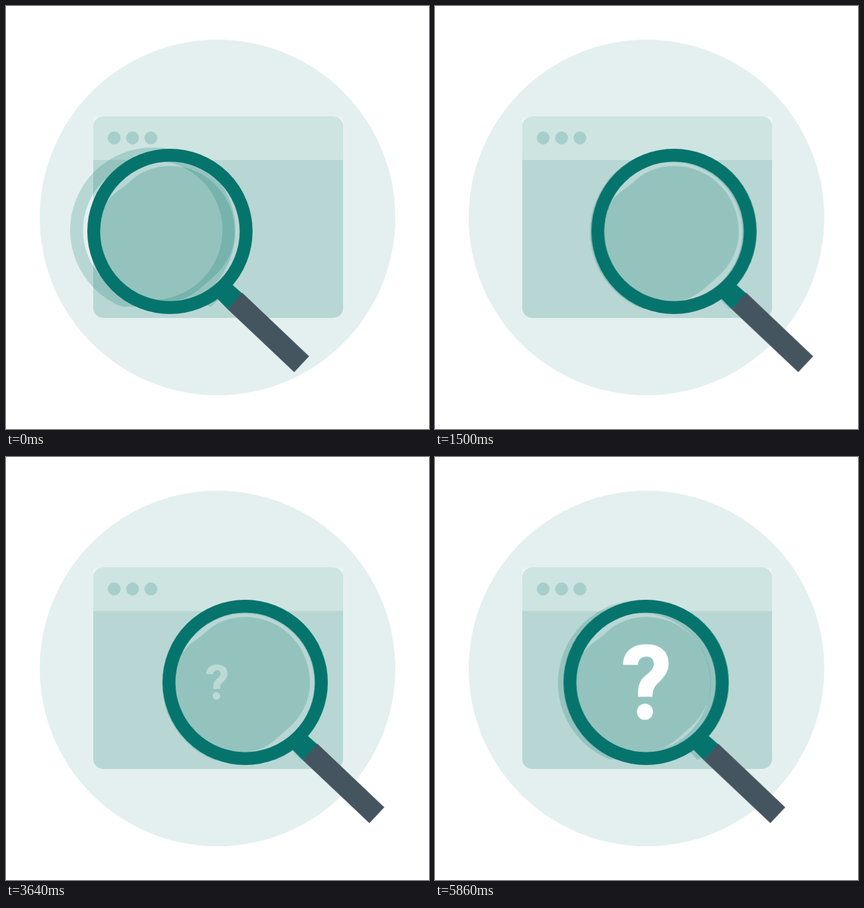
These frames come from a looping animation (640 px wide and 640 px high, 7.21 s). An HTML page:

```html
<!DOCTYPE html>
<html lang="en">
<head>
<meta charset="utf-8">
<title>Searching a window</title>
<style>
  html, body { margin: 0; width: 100%; height: 100%; overflow: hidden; background: #fff; }
  svg { display: block; width: 100vw; height: 100vh; }

  .lens, .shadow, .size, .mark { animation: 7210ms linear infinite; }
  .lens { animation-name: lens; }
  .shadow { animation-name: shadow; opacity: .2; }
  .size { animation-name: grow; }
  .mark { animation-name: appear; }

  /* Sweep right, then settle back over the centre. */
  @keyframes lens {
    0% { transform: translate(248px, 341px); animation-timing-function: cubic-bezier(.36, .04, .62, 1); }
    33.84% { transform: translate(410.4px, 341px); animation-timing-function: cubic-bezier(.37, .06, .57, 1); }
    68.24%, 100% { transform: translate(319.4px, 341px); }
  }
  @keyframes shadow {
    0% { transform: translate(222px, 339px); animation-timing-function: cubic-bezier(.36, .04, .62, 1); }
    33.84% { transform: translate(418.5px, 343.2px); animation-timing-function: cubic-bezier(.37, .06, .57, 1); }
    68.24%, 100% { transform: translate(311px, 341.6px); }
  }
  @keyframes grow {
    0%, 37.73% { transform: scale(0); animation-timing-function: cubic-bezier(.35, .17, .63, 1); }
    67.96%, 100% { transform: scale(1); }
  }
  @keyframes appear {
    0%, 38.83% { opacity: 0; }
    69.76%, 100% { opacity: 1; }
  }
</style>
</head>
<body>
<svg viewBox="0 0 640 640">
  <defs>
    <g id="frame">
      <circle r="115.25" fill="none" stroke="#05746c" stroke-width="19.5"/>
      <path d="M65 95 88 75 110 94.5 87 117.5Z" fill="#05746c"/>
    </g>
    <clipPath id="shadowCut"><rect x="-130" y="-130" width="260" height="246"/></clipPath>
    <clipPath id="windowShape"><rect x="132" y="167.5" width="378" height="304.5" rx="15"/></clipPath>
  </defs>

  <circle cx="320" cy="320" r="269" fill="#e4f0ef"/>
  <rect x="132" y="167.5" width="378" height="20" fill="#ecf4f3"/>

  <g clip-path="url(#windowShape)">
    <rect x="132" y="167" width="378" height="306" fill="#b8d7d4"/>
    <rect x="132" y="167" width="378" height="66" fill="#cee4e1"/>
  </g>
  <g fill="#a6cfcb">
    <circle cx="163.7" cy="199.6" r="9.8"/>
    <circle cx="191.5" cy="199.6" r="9.8"/>
    <circle cx="219.2" cy="199.6" r="9.8"/>
  </g>

  <g class="shadow"><use href="#frame" clip-path="url(#shadowCut)"/></g>

  <g class="lens">
    <path fill="#05746c" fill-opacity=".2" d="M-97.5-40C-88-58-74-63-63-73C-45-91-23-99 0-99C54.5-99 98-55 98 0C98 30 84 52 68 67C50 82 36 100 8 105.2A105.5 105.5 0 0 1-97.5-40Z"/>
    <use href="#frame"/>
    <path fill="#455560" d="M109.5 93 210.5 189 188 213 87 117.5Z"/>
  </g>

  <g transform="translate(319 340.5)">
    <g class="size">
      <g class="mark" fill="#fff">
        <path d="M-12 22.2C-12 4-9-3 1-11C9-17.5 12-22 12-27.5C12-34 8-38.5 1-38.5C-6-38.5-11.7-34.5-12-26H-34.5C-34.5-46-20-57.3 1-57.3C22-57.3 34.5-46 34.5-28C34.5-15 27-7 20 0C12 7 10.5 12 10 22.2Z"/>
        <circle cx="-1.3" cy="45" r="12.2"/>
      </g>
    </g>
  </g>
</svg>
</body>
</html>
```
